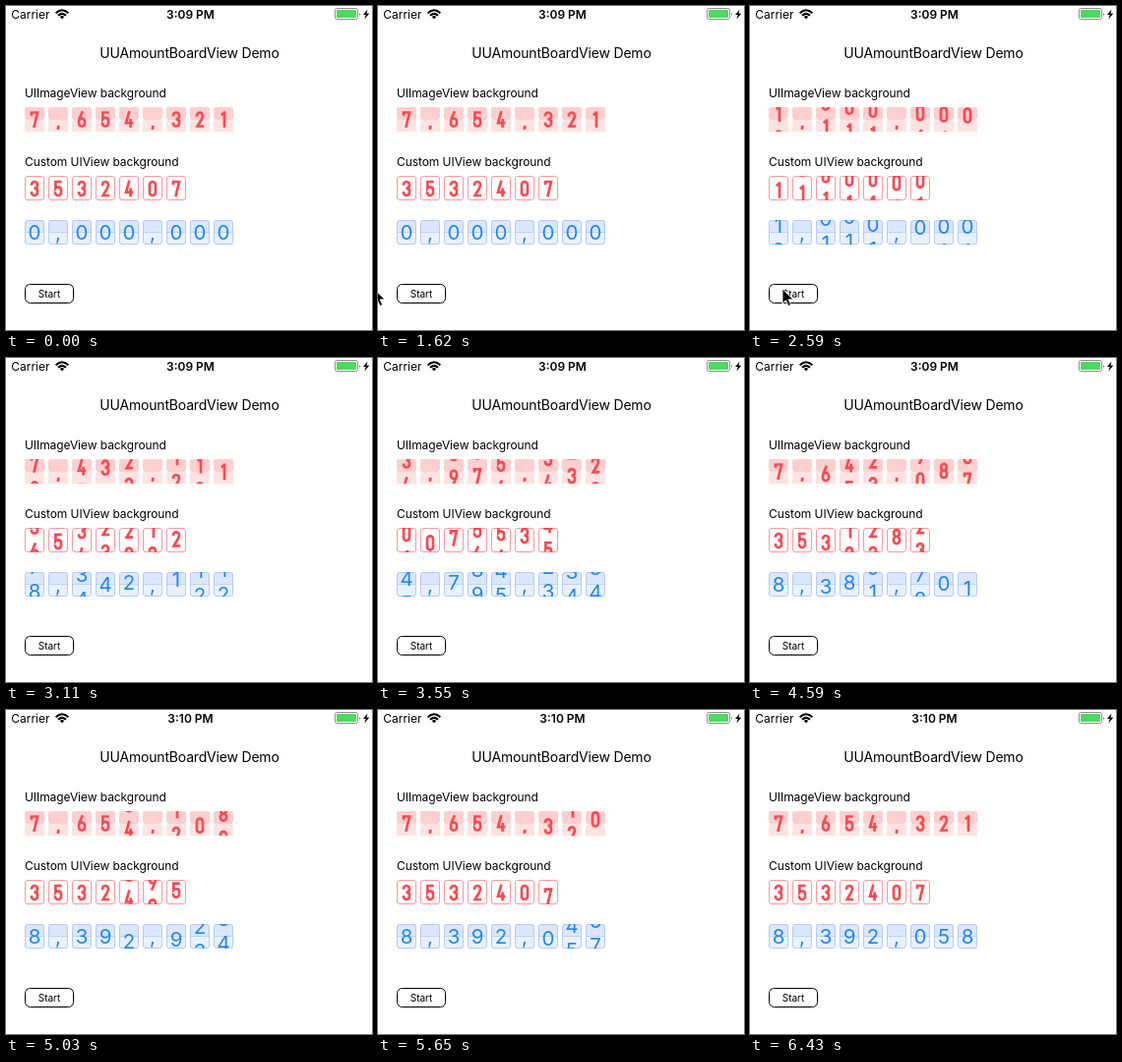
Recreate the animation shown at these times as an HTML page. Size 372 by 330 pixels, loop 8.4 s.

```html
<!DOCTYPE html>
<html lang="en">
<head>
<meta charset="utf-8">
<title>Amount board</title>
<style>
  html, body { margin: 0; width: 100%; height: 100%; overflow: hidden; background: #fff; }
  svg { display: block; }
  text { font-family: Inter, Roboto, "Liberation Sans", sans-serif; font-size: 12px; }
  .title { font-size: 14px; letter-spacing: -.0135em; text-anchor: middle; }
  .label { letter-spacing: -.0055em; }
  .clock { font-weight: 600; text-anchor: middle; }
  .button { font-size: 10px; text-anchor: middle; }
  .blue { font-size: 20.5px; fill: #1f87f0; text-anchor: middle; }
  .red { fill: none; stroke: #fb4a52; stroke-width: 2.7; }
</style>
</head>
<body>
<svg id="stage" width="372" height="330" viewBox="0 0 372 330">
  <defs>
    <g id="flap">
      <path d="M0 2Q0 0 2 0H18Q20 0 20 2V11L18.500 13H1.500L0 11Z" fill="#ffcfcf"/>
      <path d="M1.500 13H18.500L20 15V25H0V15Z" fill="#ffe3e2"/>
    </g>
    <rect id="outline" x=".5" y=".5" width="19" height="24" rx="2.5" fill="#fff" stroke="#f79a9d"/>
    <g id="card">
      <rect width="20" height="25" rx="3" fill="#e9f1fe"/>
      <path d="M0 12.5V3Q0 0 3 0H17Q20 0 20 3V12.5Z" fill="#dbe7fd"/>
      <path d="M0 12.5H20" stroke="#bdd3f8"/>
      <rect x=".5" y=".5" width="19" height="24" rx="2.5" fill="none" stroke="#b3ccf8"/>
    </g>
  </defs>

  <text x="5.200" y="12.500">Carrier</text>
  <g fill="none" stroke="#000" stroke-width="2">
    <path d="M50.600 7.200Q57 1.200 63.400 7.200M53 9.700Q57 6 61 9.700"/>
    <path d="M57 13.200L54.800 11Q57 9.200 59.200 11Z" fill="#000" stroke="none"/>
  </g>
  <text id="clock" class="clock" x="187.500" y="12.500">3:09 PM</text>
  <rect x="334.500" y="2.500" width="23" height="11" rx="2" fill="#fff" stroke="#8b8b8b"/>
  <rect x="336" y="4" width="20" height="8" rx="1" fill="#4cd964"/>
  <path d="M359 6.500Q361 8.500 359 10.500Z" fill="#8b8b8b"/>
  <path d="M367.500 3.500L363 9H365.700L364.500 13.500L369.300 7.500H366.500Z"/>

  <text class="title" x="186.500" y="53">UUAmountBoardView Demo</text>
  <text class="label" x="19" y="92.500">UIImageView background</text>
  <text class="label" x="19" y="162.500">Custom UIView background</text>
  <g id="boards"></g>
  <rect x="19.500" y="283.500" width="49" height="19" rx="5" fill="#fff" stroke="#000"/>
  <text class="button" x="44" y="296.700">Start</text>
  <path id="cursor" d="M0 0V15L3.500 11.800L6 17.500L8.600 16.400L6.200 10.900H11Z" stroke="#fff" stroke-width=".9"/>
</svg>
<script>
const LOOP = 8400, FIRST = 1620, STEP = 87.45;
const RESET = 2140, START = 2215, BASE = 1945, STAGGER = 288;
const CELL = 25, PITCH = 24;

// Centre lines of the narrow red numerals, 6 by 14
const NUMERALS = {
  0: "M0 3a3 3 0 0 1 6 0V11a3 3 0 0 1-6 0Z",
  1: "M.8 2.600L4 .2M4-1.300V15.300",
  2: "M0 4V3a3 3 0 0 1 6 0Q6 5 4.500 7.500L.6 14H7.200",
  3: "M0 3.800V3a3 3 0 0 1 6 0V4Q6 6.600 2.500 6.600Q6 6.600 6 9.500V11a3 3 0 0 1-6 0V10",
  4: "M3.400-1.300L0 10.600H7.300M4.600 6.500V15.300",
  5: "M6.700 0H.4V6.600Q1.300 5.400 3 5.400Q6 5.400 6 8.500V11a3 3 0 0 1-6 0V10.200",
  6: "M4-1.300L.8 6Q0 8 0 11a3 3 0 0 0 6 0V9a3 3 0 0 0-6 0",
  7: "M0 3.200V0H6L2.400 15.300",
  8: "M3 0A2.700 2.700 0 0 0 .3 2.700V4a2.700 2.700 0 0 0 5.400 0V2.700A2.700 2.700 0 0 0 3 0ZM3 6.700a3 3 0 0 0-3 3V11a3 3 0 0 0 6 0V9.700a3 3 0 0 0-3-3Z",
  9: "M2 15.300L5.200 8Q6 6 6 3a3 3 0 0 0-6 0V5a3 3 0 0 0 6 0",
  ",": "M3.200 13.200V15.400L2.600 17.200"
};

const boards = [
  { value: "7,654,321", initial: "7,654,321", y: 103, tile: "flap", style: "red", baseline: 5.5 },
  { value: "3532407", initial: "3532407", y: 173, tile: "outline", style: "red", baseline: 6 },
  { value: "8,392,058", initial: "0,000,000", y: 218, tile: "card", style: "blue", baseline: 20.2 }
];

const $ = id => document.getElementById(id);

function add(parent, tag, attrs) {
  const node = document.createElementNS("http://www.w3.org/2000/svg", tag);
  for (const key in attrs) node.setAttribute(key, attrs[key]);
  return parent.appendChild(node);
}

function drawGlyph(parent, char, style, y) {
  if (style === "red") {
    add(parent, "path", { d: NUMERALS[char], class: style, transform: `translate(7 ${y})` });
  } else {
    add(parent, "text", { x: 10, y, class: style }).textContent = char;
  }
}

const wheels = [];
for (const { value, initial, y, tile, style, baseline } of boards) {
  [...value].forEach((char, i) => {
    const column = add($("boards"), "svg", {
      x: 19 + PITCH * i, y, width: 20, height: CELL, overflow: "hidden"
    });
    add(column, "use", { href: "#" + tile });
    const strip = add(column, "g", {});
    if (char === ",") return drawGlyph(strip, char, style, baseline);
    for (let n = 0; n <= 10; n++) drawGlyph(strip, n % 10, style, baseline + n * CELL);
    wheels.push({ strip, initial: +initial[i], total: 10 + +char, duration: BASE + STAGGER * i });
  });
}

const clamp = u => Math.min(1, Math.max(0, u));

// cubic-bezier(.42, 0, .58, 1)
function easeInOut(u) {
  let s = u;
  for (let k = 0; k < 6; k++) {
    s -= (((.52 * s - .78) * s + 1.26) * s - u) / ((1.56 * s - 1.56) * s + 1.26);
  }
  return s * s * (3 - 2 * s);
}

function cursorX(t) {
  if (t < FIRST) return -20;
  return t < 2600 ? -4 + 37 * clamp((t - FIRST) / 348) : 33 - 46 * clamp((t - 2670) / 345);
}

// The screen refreshes in even steps
function snap(t) {
  const n = Math.floor((t - FIRST) / STEP + .06);
  return n < 0 ? 0 : FIRST + n * STEP;
}

function render(now) {
  const t = snap(now % LOOP);
  for (const { strip, initial, total, duration } of wheels) {
    const turn = t < RESET - 10 ? initial : total * easeInOut(clamp((t - START) / duration));
    strip.setAttribute("transform", `translate(0 ${-(turn % 10) * CELL})`);
  }
  $("cursor").setAttribute("transform", `translate(${cursorX(t)} 288)`);
  $("clock").textContent = t < 4850 ? "3:09 PM" : "3:10 PM";
}

const begin = performance.now();
function tick() {
  render(performance.now() - begin);
  requestAnimationFrame(tick);
}
tick();
</script>
</body>
</html>
```
